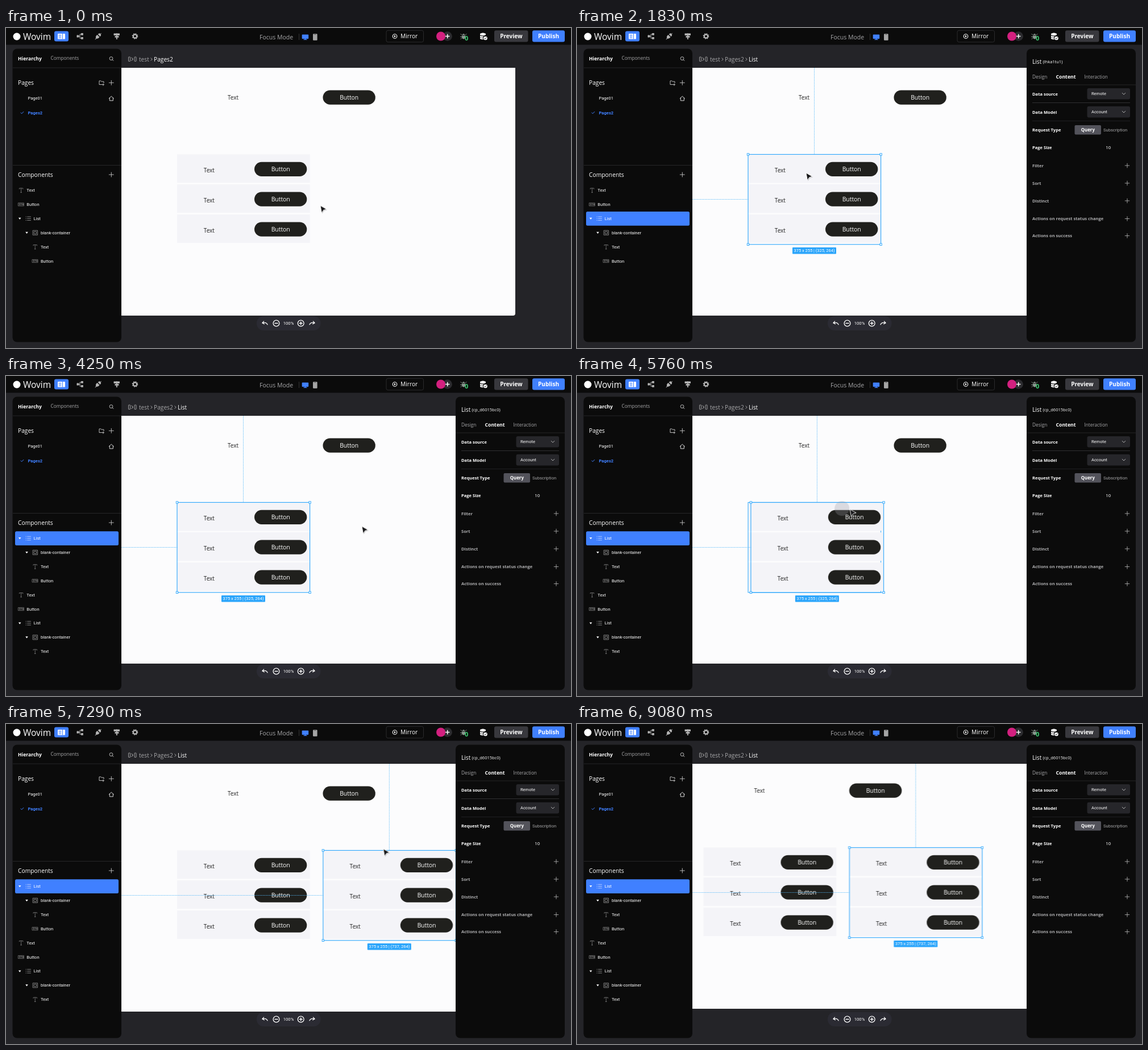
An HTML page for the animation above (9.73 s loop, 994 by 563 pixels).

```html
<!DOCTYPE html>
<html lang="en">
<head>
<meta charset="utf-8">
<title>Page editor</title>
<style>
html, body { margin: 0; width: 100%; height: 100%; overflow: hidden; background: #242428; }
svg { display: block; }
text { font-family: "Open Sans", "Noto Sans", sans-serif; fill: #fff; white-space: pre; }
text.r { font-family: Roboto, Arial, sans-serif; }
text.b { font-weight: 700; }
.icon { fill: none; stroke: #ddd; stroke-width: 1; stroke-linecap: round; stroke-linejoin: round; }

.anim { animation: 9730ms linear infinite; }
.step { animation: 9730ms step-end infinite; }
#pan { animation-name: pan; }
#copy { animation-name: drag; }
#side { animation-name: slide; }
#cursor { animation-name: move; }
#press { animation-name: press; }
.idle { animation-name: idle; }
.picked { animation-name: picked; }
.first { animation-name: first; }
.pasted { animation-name: pasted; }
.unpasted { animation-name: unpasted; }
.lifted { animation-name: lifted; }
.dropped { animation-name: dropped; }
.hover { animation-name: hover; }
.arrow { animation-name: arrow; }
.hand { animation-name: hand; }
.ring { animation-name: ring; }

@keyframes idle { 0% { opacity: 1 } 14.594%, 100% { opacity: 0 } }
@keyframes picked { 0% { opacity: 0 } 14.594%, 100% { opacity: 1 } }
@keyframes first { 0% { opacity: 0 } 14.594% { opacity: 1 } 43.679%, 100% { opacity: 0 } }
@keyframes unpasted { 0% { opacity: 1 } 43.679%, 100% { opacity: 0 } }
@keyframes pasted { 0% { opacity: 0 } 43.679%, 100% { opacity: 1 } }
@keyframes lifted { 0% { opacity: 1 } 71.223%, 100% { opacity: 0 } }
@keyframes dropped { 0% { opacity: 0 } 71.223%, 100% { opacity: 1 } }
@keyframes hover { 0% { opacity: 0 } 1.7% { opacity: 1 } 14.594% { opacity: 0 } 58.171% { opacity: 1 } 60.6%, 100% { opacity: 0 } }
@keyframes arrow { 0% { opacity: 1 } 76.876% { opacity: 0 } 88.386%, 100% { opacity: 1 } }
@keyframes hand { 0% { opacity: 0 } 76.876% { opacity: 1 } 88.386%, 100% { opacity: 0 } }
@keyframes ring { 0% { opacity: 0 } 11.1% { opacity: 1 } 15% { opacity: 0 } 54.676% { opacity: 1 } 66.598%, 100% { opacity: 0 } }

@keyframes slide {
  0%, 14.594% { transform: translate(206px, 0); animation-timing-function: ease-out }
  17%, 100% { transform: none }
}
@keyframes drag {
  0%, 58.171% { transform: translate(0, 0) }
  59.198% { transform: translate(4.5px, 0) }
  61.665% { transform: translate(90px, 4px) }
  67.112%, 68.345% { transform: translate(239px, -5px) }
  71.223%, 100% { transform: translate(256.8px, 0) }
}
@keyframes pan {
  0%, 76.876% { transform: translate(0, 0) }
  79.137% { transform: translate(-22px, 2.5px) }
  81.192% { transform: translate(-50px, 1.3px) }
  82.426%, 84.687% { transform: translate(-56px, 1.5px) }
  88.386%, 100% { transform: translate(-78.5px, -5px) }
}
@keyframes move {
  0%, .822% { transform: translate(553px, 312.5px) }
  2.569%, 4.317% { transform: translate(488px, 302px) }
  7.7% { transform: translate(430px, 230px) }
  11.1%, 19.733% { transform: translate(403px, 255px) }
  30.832%, 47.996% { transform: translate(626px, 264.5px) }
  52.21%, 54.676% { transform: translate(428px, 234px) }
  55.498%, 58.171% { transform: translate(418px, 234px) }
  59.198% { transform: translate(480px, 234.5px) }
  61.665% { transform: translate(508px, 238px) }
  67.112%, 68.345% { transform: translate(657px, 229px) }
  71.223%, 73.998% { transform: translate(675px, 234px) }
  76.876% { transform: translate(640px, 190px) }
  79.137% { transform: translate(618px, 192.5px) }
  81.192% { transform: translate(590px, 191.3px) }
  82.426%, 84.687% { transform: translate(584px, 191.5px) }
  88.386% { transform: translate(561.5px, 185px) }
  93.32%, 100% { transform: translate(1000px, -20px) }
}
@keyframes press {
  0%, 19% { transform: translate(400px, 253px) }
  19.1%, 58.171% { transform: translate(415px, 234px) }
  59.198% { transform: translate(466px, 233px) }
  61.665% { transform: translate(502px, 237px) }
  67.112%, 100% { transform: translate(655px, 229px) }
}
</style>
</head>
<body>
<svg id="stage" width="994" height="563" viewBox="0 0 994 563"></svg>
<script>
const BLUE = '#4080ff', PICK = '#2ba5fb', PANEL = '#0b0b0b', BACK = '#242428', GREY = '#a6a6a8';

const text = (x, y, s, size, cls = '', fill = '#fff', anchor = 'start') =>
  `<text x="${x}" y="${y}" font-size="${size}" class="${cls}" style="fill:${fill}" text-anchor="${anchor}">${s}</text>`;
const rect = (x, y, w, h, fill, r = 0, extra = '') =>
  `<rect x="${x}" y="${y}" width="${w}" height="${h}" rx="${r}" fill="${fill}" ${extra}/>`;
const circle = (x, y, r, fill, extra = '') => `<circle cx="${x}" cy="${y}" r="${r}" fill="${fill}" ${extra}/>`;
const icon = (x, y, d, color = '#ddd', w = 1) =>
  `<path class="icon" transform="translate(${x} ${y})" d="${d}" style="stroke:${color};stroke-width:${w}"/>`;
const solid = (x, y, d, color = '#fff') => `<path transform="translate(${x} ${y})" d="${d}" fill="${color}"/>`;
const plus = (x, y, r = 4, color = '#c8c8c8', w = .9) => icon(x, y, `M${-r} 0H${r}M0 ${-r}V${r}`, color, w);
const line = (x1, y, x2, color = '#262628') => rect(x1, y, x2 - x1, 1, color);
const show = (name, body) => `<g class="step ${name}">${body}</g>`;

const pill = (x, y) => rect(x, y, 92.3, 25.2, '#20201d', 12.6) +
  text(x + 46.2, y + 16.4, 'Button', 10.4, '', '#fff', 'middle');

function list() {
  return [0, 1, 2].map(i => {
    const y = 222.3 + i * 52.9;
    return rect(301, y, 233.7, 50, '#f4f4f8') + text(347.8, y + 31.6, 'Text', 10, '', '#222') + pill(437, y + 13.4);
  }).join('');
}

function selection() {
  const corner = (x, y) => rect(x - 1.7, y - 1.7, 3.4, 3.4, '#fff', 0, `stroke="${PICK}" stroke-width=".9"`);
  const label = pos => text(417.5, 394.4, `375 x 255 | (${pos}, 264)`, 7.5, 'r', '#fff', 'middle');
  return `<path d="M417.5-100V222M-300 301.5H301" stroke="#53b8f8" stroke-width=".8" stroke-dasharray="1.5 1"/>` +
    rect(301, 222.4, 233.6, 158.4, 'none', 0, `stroke="${PICK}" stroke-width="1.1"`) +
    corner(301, 222.4) + corner(534.6, 222.4) + corner(301, 380.8) + corner(534.6, 380.8) +
    rect(379, 386, 77, 11.5, PICK, 1) +
    show('lifted', label(325)) + show('dropped', label(737));
}

function canvas() {
  return `<g clip-path="url(#view)"><g id="pan" class="anim">` +
    rect(-100, -100, 996, 606, '#fcfcfd', 4) +
    text(390, 126, 'Text', 10, '', '#222') + pill(557.5, 109.6) + list() +
    show('hover', rect(301, 222.4, 233.6, 158.4, 'none', 0, `stroke="${PICK}"`)) +
    show('picked', `<g id="copy" class="anim">${list()}${selection()}</g>`) +
    '</g></g>';
}

function topBar() {
  const gear = circle(227, 14.5, 3.2, 'none', 'stroke="#b5b5b5" stroke-width="2.2"') +
    circle(227, 14.5, 4.6, 'none', 'stroke="#b5b5b5" stroke-width="1.5" stroke-dasharray="1.8 1.81"');
  return rect(0, 0, 994, 29.5, PANEL) +
    circle(19, 15, 6.5, '#fff') + text(30, 20.5, 'Wovim', 15.5, '', '#fff') +
    rect(85, 5.5, 25, 18, BLUE, 3) + rect(91, 10, 13, 9.5, '#fff', 1) +
    icon(93, 12.5, 'M0 0H4M0 2.3H4M0 4.6H4M6.5-2V6.5', BLUE, 1) +
    icon(130, 14.5, 'M-3 0H0V-3.5H2M0 0V3.5H2', '#b5b5b5') +
    rect(124.5, 12.5, 3.8, 4, '#b5b5b5', .5) + rect(132, 9, 3.8, 3.8, '#b5b5b5', .5) + rect(132, 16, 3.8, 3.8, '#b5b5b5', .5) +
    solid(162, 14.5, 'M-5.5 5.5L-3.8 3.5Q-5 0-1.5-2.5L2.5 1.5Q0 5-3 4.2L-5 6ZM-.3-3.5Q3-6.5 4-4L5.5-5.5L6-5L4.6-3.5Q6-1.5 3.5.5Z', '#b5b5b5') +
    rect(189.5, 9.5, 10.5, 3.4, '#b5b5b5', .6) + rect(191.5, 14, 7, 2.8, '#b5b5b5', .6) + rect(194, 9.5, 1.8, 10.5, '#b5b5b5') + gear +
    text(446, 20, 'Focus Mode', 10.5, '', GREY) + rect(515, 10, 1, 11, '#333') +
    rect(520.7, 11.5, 11.5, 7.4, BLUE, 1) + rect(523.5, 19.8, 6, 1.2, BLUE) + rect(525.6, 18, 1.8, 2.5, BLUE) +
    rect(540, 10.3, 7.6, 11.4, '#a5a5a5', 1.2) + rect(542.5, 11.2, 2.6, .8, '#444') +
    rect(669, 4.3, 65.5, 20.5, 'none', 3, 'stroke="#2b2b2d"') +
    circle(684, 14.5, 3.8, 'none', 'stroke="#fff" stroke-width="1.1"') + solid(684, 14.5, 'M-1.2-2L2 0L-1.2 2Z') +
    text(694, 18.2, 'Mirror', 10.2) +
    circle(776.7, 14.5, 8.2, '#2b2b2e') + circle(765, 14.5, 8, '#d3207f') + plus(776.7, 14.5, 3.2, '#fff', 1.5) +
    solid(805, 14.5, 'M-2.8-2Q0-7 2.8-2ZM-3-1H3V2Q2 5 0 5Q-3 4.5-3 1Z', '#8b9890') +
    icon(805, 14.5, 'M-5-4L-3-2M5-4L3-2M-5.5 1H-3M-5 5L-3 3', '#8b9890') +
    text(807, 22.3, '0', 11, 'b', '#3ccf72') +
    solid(839, 14, 'M-5-4Q0-7 5-4V-2Q0 1-5-2ZM-5-.8Q-2 1 1 .8L0 3Q-4 3-5 1.5ZM-5 2.6Q-3 4 0 4L1 6Q-4 6.5-5 4.5Z') +
    circle(843.5, 18, 3.3, '#fff') + icon(843.5, 18, 'M-1.5 0L-.4 1.2L1.7-1.2', '#111', .9) +
    rect(859, 4.3, 59.5, 20.2, '#38383d', 3) + text(888.8, 18.2, 'Preview', 10, 'b', '#fff', 'middle') +
    rect(926, 4.3, 57, 20.2, BLUE, 3) + text(954.5, 18.2, 'Publish', 10.1, 'b', '#fff', 'middle');
}

function crumbs() {
  const chevron = x => icon(x, 55, 'M-1.2-2.2L1.2 0L-1.2 2.2', '#b0b0b0', .9);
  return rect(215.5, 51, 3, 7.5, 'none', .5, 'stroke="#aaa" stroke-width=".9"') +
    rect(226, 51, 3, 7.5, 'none', .5, 'stroke="#aaa" stroke-width=".9"') +
    icon(222.3, 54.8, 'M-1.5-2.5L1.3 0L-1.5 2.5', '#ccc') +
    text(234, 58.7, 'test', 10.2, '', GREY) + chevron(256) +
    show('idle', text(260, 58.7, 'Pages2', 10.2)) +
    show('picked', text(260, 58.7, 'Pages2', 10.2, '', GREY) + chevron(298) + text(302, 58.7, 'List', 10.1));
}

// Each row is a kind and its depth.
function tree(rows, picked) {
  const caret = (x, y) => solid(x, y, 'M-2.3-1.5H2.3L0 1.8Z');
  return rows.map(([kind, depth], i) => {
    const y = 285.5 + i * 24.9, nest = depth * 12.3;
    const base = i === picked ? rect(16, y - 12.3, 182, 24.8, BLUE, 2.5) : '';
    const tone = i === picked ? '#b9cfff' : '#8e8e8e';
    let x = 36.3 + nest, art;
    if (kind === 'List') {
      x = 48.5;
      art = caret(24.2, y) + icon(39.5, y, 'M-4.5-3.2H-4M-4.5 0H-4M-4.5 3.2H-4M-2-3.2H4M-2 0H4M-2 3.2H4', tone, .9);
    } else if (kind === 'blank-container') {
      x = 61;
      art = caret(36.5, y) + icon(51.5, y, 'M-4-4H4V4H-4ZM-2-2H2V2H-2Z', '#9a9a9a', .8);
    } else {
      const d = kind === 'Text' ? 'M-3.2-2.2V-3.6H3.2V-2.2M0-3.6V3.8M-1 3.8H1' : 'M-4.8-2.6H4.8V2.6H-4.8ZM-3-1V1H-1.4V-1ZM.2-1H1.8M1-1V1M2.8 1V-1L3.8 1V-1';
      art = icon(26.6 + nest, y, d, '#8e8e8e', .7);
    }
    return base + art + text(x, y + 2.5, kind, 7.6, 'r');
  }).join('');
}

function leftPanel() {
  const leaves = d => [['Text', d], ['Button', d]];
  const block = [['List', 0], ['blank-container', 1], ...leaves(2)];
  const before = [...leaves(0), ...block];
  const after = [...block, ...leaves(0), ...block.slice(0, 3)];
  return rect(11.5, 36.5, 191.5, 516, PANEL, 8) +
    text(21, 56.8, 'Hierarchy', 8.6, 'b') + text(78.5, 56.4, 'Components', 8.3, '', GREY) +
    circle(185, 53.6, 2.9, 'none', 'stroke="#ccc" stroke-width=".9"') + icon(187.2, 55.8, 'M0 0L1.8 1.8', '#ccc', .9) +
    line(12, 69.5, 203) + text(21, 99.7, 'Pages', 10.2) +
    icon(168, 96.5, 'M1 3H-4V-3.5H-1.2L0-2.3H4V0M3 1.5V4.7M1.4 3.1H4.6', '#ccc', .9) + plus(185.3, 96.3) +
    text(38.5, 126, 'Page01', 7.5, 'r') +
    icon(185.3, 124, 'M-4.2 0L0-3.9L4.2 0M-3-1V3.8H3V-1', '#eee', .9) +
    icon(28.3, 149, 'M-2.3 0L-.6 1.7L2.5-1.6', BLUE, 1) + text(38.5, 151.5, 'Pages2', 7.6, 'r b', BLUE) +
    line(12, 241, 203) + text(21, 261.8, 'Components', 10.3) + plus(185.3, 258) +
    show('idle', tree(before, -1)) + show('first', tree(before, 2)) + show('pasted', tree(after, 0));
}

function rightPanel() {
  const drop = (y, s) => rect(897.5, y - 9.8, 75.5, 19.6, '#26262a', 3) + text(905, y + 2.3, s, 7.5, 'r') +
    icon(962, y, 'M-2.8-1.4L0 1.4L2.8-1.4', '#bbb', .9);
  const label = (y, s, fill) => text(801, y + 2.8, s, 7.55, 'b', fill);
  const extras = [[242, 'Filter'], [273, 'Sort'], [304, 'Distinct'], [335.5, 'Actions on request status change'], [365.5, 'Actions on success']];
  return rect(791, 30, 205, 533, BACK) + rect(791, 36.5, 192, 516, PANEL, 8) +
    text(801, 62.5, 'List', 10.2) +
    show('unpasted', text(819.5, 61.5, '(lhka1tu1)', 7.5)) + show('pasted', text(819.5, 61.5, '(cp_d6015bc0)', 7.5)) +
    text(801, 88.8, 'Design', 8.3, '', GREY) + text(842.5, 89, 'Content', 8.7, 'b') + text(892.5, 88.8, 'Interaction', 8.2, '', GREY) +
    line(791, 99.5, 983) + label(116, 'Data source') + drop(115.7, 'Remote') +
    line(801, 131, 973, '#303032') + label(148, 'Data Model') + drop(147.6, 'Account') +
    line(801, 163, 973, '#202022') + label(179.5, 'Request Type') +
    rect(875.5, 171, 46.5, 16.5, '#53535b', 2) + text(898.8, 182.3, 'Query', 7.9, 'b', '#fff', 'middle') +
    text(926, 182, 'Subscription', 7.55, 'r', GREY) +
    label(210.5, 'Page Size') + text(930.3, 213.3, '10', 7.8, 'r') +
    extras.map(([y, s]) => label(y, s, '#adadaf') + plus(968, y, 3.8, '#bbb', .8)).join('');
}

function zoomBar() {
  const ring = x => circle(x, 519.5, 5.4, 'none', 'stroke="#fff" stroke-width="1.3"');
  const back = 'M4.5 2.3Q2.5-2.2-3-.8M-2-3.4L-4.6-.6L-1.2 1.3';
  return rect(441, 507, 112.5, 25, '#2b2b33', 12) + icon(455.5, 519.5, back, '#fff', 1.3) +
    ring(475.5) + icon(475.5, 519.5, 'M-2.6 0H2.6', '#fff', 1.4) +
    text(497, 521.8, '100%', 7.7, 'r', '#fff', 'middle') +
    ring(518.7) + plus(518.7, 519.5, 2.6, '#fff', 1.4) +
    `<g transform="translate(1077 0) scale(-1 1)">${icon(538.5, 519.5, back, '#fff', 1.3)}</g>`;
}

function pointer() {
  const head = 'M0 0L11 6.2L5.7 7.8L2.4 12.8Z';
  const palm = 'M-4.3 1.2Q-5.2-1-3.4-1.6Q-4-4-2-3.7Q-1-5.2.3-4Q2-4.8 2.7-3.2Q4.6-3.4 4.6-1.2Q4.8 2.6 2.8 5H-2Q-3 3.4-4.3 1.2Z';
  return `<g id="press" class="anim">${show('ring', circle(0, 0, 13, 'rgba(150,150,162,.28)'))}</g>` +
    '<g id="cursor" class="anim">' +
    show('arrow', solid(1, 1.2, head, 'rgba(0,0,0,.22)') + `<path d="${head}" fill="#18181a" stroke="#fff" stroke-width=".9"/>`) +
    show('hand', `<path d="${palm}" fill="#fff" stroke="#222" stroke-width="1"/>`) + '</g>';
}

document.getElementById('stage').innerHTML =
  '<defs><clipPath id="view"><rect x="203" y="70" width="791" height="493"/></clipPath></defs>' +
  rect(0, 0, 994, 563, BACK) + canvas() + crumbs() + leftPanel() + zoomBar() +
  `<g id="side" class="anim">${rightPanel()}</g>` + topBar() + pointer();
</script>
</body>
</html>
```
